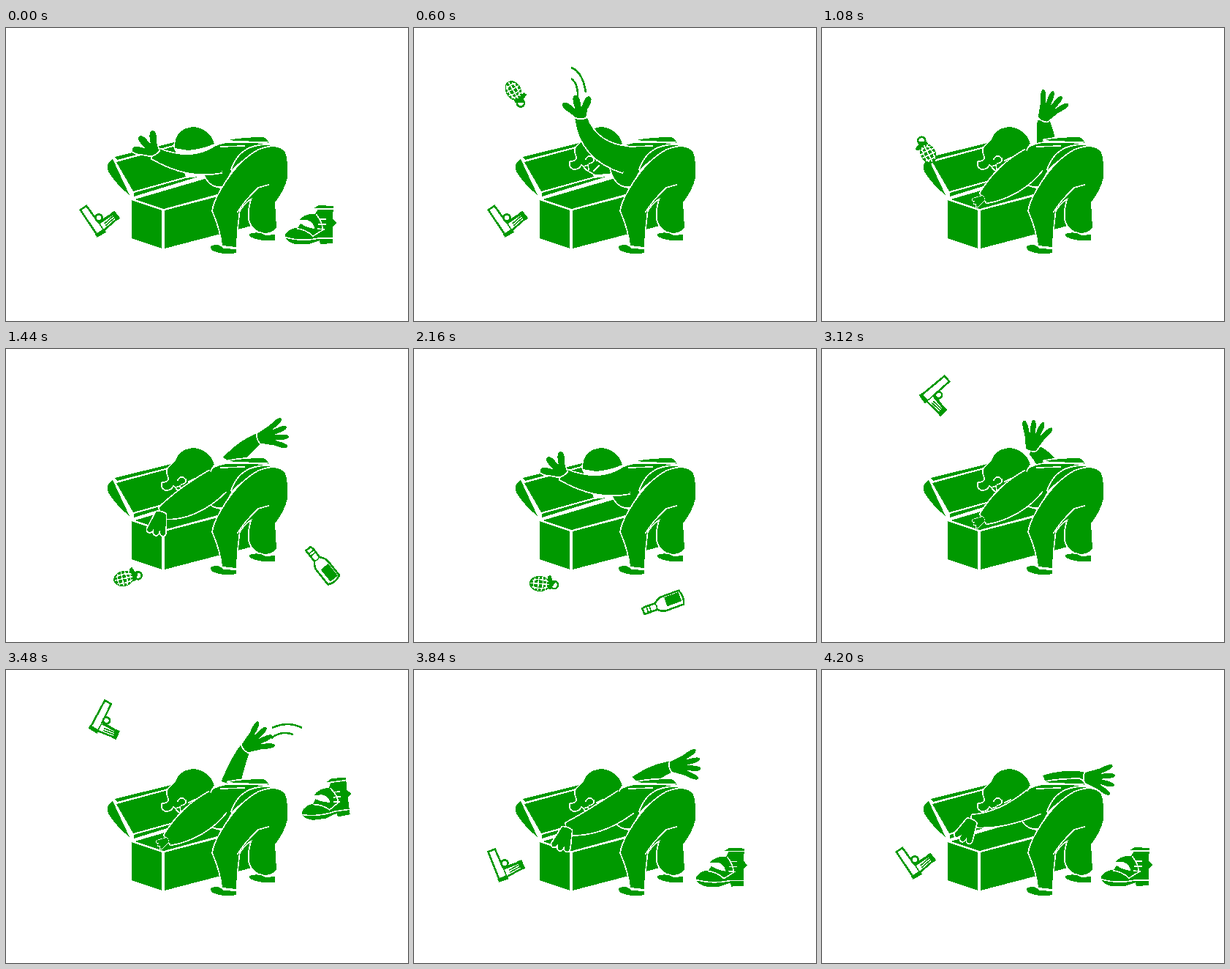
An HTML page that plays this animation: 550 by 400 pixels, repeating every 4.32 s.

```html
<!DOCTYPE html>
<html lang="en">
<head>
<meta charset="utf-8">
<title>Rummaging in the chest</title>
<style>
  html, body { margin: 0; width: 100%; height: 100%; overflow: hidden; background: #fff; }
  svg { display: block; width: 550px; height: 400px; }
  .solid { fill: #090; }
  .body { fill: #090; stroke: #fff; stroke-width: 3.4; stroke-linejoin: round; paint-order: stroke; }
  .cut { fill: none; stroke: #fff; stroke-width: 1.6; stroke-linecap: round; }
  .line { fill: #fff; stroke: #090; stroke-width: 2.6; stroke-linejoin: round; }
  .thin { fill: none; stroke: #090; stroke-width: 1.6; }
  .swish { fill: none; stroke: #090; stroke-width: 2.6; }
</style>
</head>
<body>
<svg viewBox="0 0 550 400" shape-rendering="crispEdges">
  <g class="solid">
    <path d="M146,179 Q136,185 140,196 Q151,214 169,228Z"/>
    <path d="M149,176 L230,156 L229,160 L152,180Z"/>
    <path d="M151,183 L229,162 L246,203 L174,223Z"/>
    <path d="M175,225 L246,205 L263,203 L175,230Z"/>
    <path d="M176,234 L272,206 L300,224 L216,247Z"/>
    <path d="M172,235 L213,249 V301 L172,287Z"/>
    <path d="M217,249 L340,217 V269 L217,301Z"/>
  </g>

  <g id="farArm" class="body">
    <path id="farSleeve"/>
    <path id="farHand"/>
  </g>

  <g class="body">
    <path d="M304,153 Q325,149 352,149 Q359,151 359,158Z"/>
    <path id="face" d="M231,153 L222,163 Q219,168 223,176 Q224,182 214,183 Q212,189 218,192 Q226,193 229,185 L236,193 L248,200 L268,199 L282,170 L284,156Z"/>
    <path d="M231,164 Q230,137 257,135 Q279,138 285,158 Q270,165 249,167Z" stroke="none"/>
    <path d="M283,163 Q300,154 330,156 L360,159 Q325,167 310,192 L297,216 Q284,218 277,209 Q271,202 269,192Z"/>
    <path d="M309,193 Q316,172 334,164 Q348,159 362,160 Q330,172 309,193Z"/>
    <path d="M297,217 Q318,182 345,167 Q372,156 382,170 Q386,180 385,204 Q381,222 368,238 L370,272 Q366,280 352,280 Q337,276 333,262 Q331,248 337,232 Q330,234 319,249 L316,275 L315,299 L296,297 Q294,275 283,250 Q284,238 297,217Z"/>
    <path d="M280,298 Q290,293 298,301 L315,302 V307 Q297,311 281,303Z"/>
    <path d="M333,281 Q346,277 355,283 L368,282 V290 H352 Q338,288 333,284Z"/>
  </g>
  <g class="cut">
    <path d="M317,251 Q326,236 345,218 L359,214"/>
    <path d="M294,162 L326,161 M304,156 L357,156"/>
    <path id="features" d="M235,179 Q240,171 246,178 Q247,184 240,185 M232,189 L238,187 L239,193 M246,195 L253,188 M250,181 L258,177"/>
  </g>

  <g class="body">
    <path id="nearArm"/>
    <path id="openHand"/>
    <path id="gripHand"/>
  </g>

  <path id="swishLeft" class="swish" d="M215,54 Q231,60 235,88 M215,69 Q225,76 224,96"/>
  <path id="swishRight" class="swish" d="M364,79 Q386,69 405,79 M363,93 Q377,82 393,88"/>

  <g id="grenade">
    <circle class="line" cx="14" cy="0" r="5"/>
    <path class="solid" d="M4,-6 L4,-11 L8,-13 L11,-6 L15,-4 L10,6 L4,6Z"/>
    <ellipse class="solid" cx="-6" cy="0" rx="14" ry="10.5"/>
    <path class="cut" d="M-16,-4 Q-6,-8 5,-4 M-18,0 H6 M-16,5 Q-6,8 5,4 M-13,-7 Q-16,0 -13,7 M-8,-9 V9 M-3,-9 Q0,0 -3,9 M2,-7 Q5,0 2,7"/>
  </g>

  <g id="bottle">
    <path class="line" d="M-29,-4 L-23,-5 L-10,-4.5 Q-5,-10 2,-10 L26,-10 Q31,0 26,10 L2,10 Q-5,10 -10,4.5 L-29,4.5Z"/>
    <path class="thin" d="M-23,-5 V5 M-19,-5 V5 M-11,-4 Q-8,0 -11,4"/>
    <path id="label" class="solid" d="M4,-8 H25 V5 H4Z"/>
  </g>

  <g id="gun">
    <path class="line" d="M-19,-15 L23,-15 L23,-5 L-5,-4 L-6,20 L-15,21 L-18,-3Z"/>
    <circle class="line" cx="0" cy="0" r="4.5"/>
    <path class="thin" d="M-20,-4 H-5 M-14,2 L-12,18 M-11,2 L-9,18 M-7,-3 V18"/>
    <path class="solid" d="M-21,-17 H-16 V-3 H-22Z M-17,18 L-4,17 V23 L-17,24Z"/>
  </g>

  <g id="boot">
    <path class="solid" d="M-34,12 Q-28,3 -17,3 L-13,-3 Q-4,3 6,4 Q6,-4 -4,-8 L-15,-8 Q-7,-17 7,-16 L11,-23 L5,-24 L12,-28 L32,-27 L31,-10 L36,-4 L31,1 V24 L14,25 L13,20 L-2,25 H-20 Q-35,21 -34,12Z"/>
    <path class="cut" d="M9,-15 Q18,-3 17,6 L4,14 Q-6,5 -17,4 M-33,16 Q-12,22 12,17 H31 M14,-9 L21,-9 M12,-2 L21,-2 M11,4 L19,5 M8,-23 L31,-23"/>
  </g>
</svg>
<script>
const LOOP = 4320, STEP = 120, HALF = 18, COUNT = 34;
const el = id => document.getElementById(id);
const show = (id, on) => { el(id).style.display = on ? '' : 'none'; };
const draw = (id, d) => el(id).setAttribute('d', d);
const place = (id, x, y, a, s = 1) =>
  el(id).setAttribute('transform', `translate(${x} ${y}) rotate(${a}) scale(${s})`);

const linear = u => u, easeIn = u => u * u, easeOut = u => u * (2 - u);

// Index of the leg of a keyed list that t falls in, and how far along it is.
function leg(keys, t) {
  let i = 0;
  while (i < keys.length - 2 && t >= keys[i + 1][0]) i++;
  const u = (t - keys[i][0]) / (keys[i + 1][0] - keys[i][0]);
  return [i, Math.min(1, Math.max(0, u))];
}
function blend(keys, t) {
  const [i, u] = leg(keys, t);
  return keys[i].map((v, n) => v + (keys[i + 1][n] - v) * u).slice(1);
}

// Tapered limb through shoulder, middle and wrist, left open at the shoulder.
function limb(x, y, w) {
  const mix = ([a, m, b], u) => a * (1 - u) * (1 - 2 * u) + m * 4 * u * (1 - u) + b * u * (2 * u - 1);
  const near = [], far = [];
  for (let u = 0; u <= 1; u += 1 / 8) {
    const px = mix(x, u), py = mix(y, u), r = mix(w, u);
    const a = Math.atan2(mix(y, u + .01) - py, mix(x, u + .01) - px);
    const dx = r * Math.sin(a), dy = r * Math.cos(a);
    near.push([px + dx, py - dy]);
    far.unshift([px - dx, py + dy]);
  }
  return 'M' + [...near, ...far].join('L');
}

// Hand pointing right from its wrist: fingers fan out between two angles.
function hand(count, from, to, length, palm, half) {
  const at = (deg, r) => [r * Math.cos(deg * Math.PI / 180), r * Math.sin(deg * Math.PI / 180)];
  let d = 'M0,-7';
  for (let i = 0; i < count; i++) {
    const a = from + (to - from) * i / (count - 1);
    d += `L${at(a - half, palm)}Q${at(a - half * .7, length)} ${at(a, length)}` +
         `Q${at(a + half * .8, length)} ${at(a + half, palm)}`;
  }
  return d + 'L0,7Q-3,0 0,-7Z';
}
draw('farHand', hand(4, -24, 34, 41, 23, 8.5));
draw('openHand', hand(3, -52, 23, 31, 15, 16));
draw('gripHand', hand(3, -20, 20, 31, 24, 9.5));

// Near arm: phase, middle x y, wrist x y, hand angle, half width, hand size.
const lean = [248, 185, 203, 171, -118, 12, 1];
const toss = [249, 160, 228, 122, -90, 13, 1];
const dig  = [256, 207, 221, 232, 150, 20, .5];
const grab = [250, 207, 212, 224, 104, 19, 1];
const pull = [246, 200, 205, 206, 117, 12, 1];
const nearPoses = [[0, lean], [2, lean], [4, toss], [5, toss], [8, dig], [11, dig], [12, grab], [17, pull]]
  .map(([t, pose]) => [t, ...pose]);
const nearShoulder = [290, 180];

// Far arm: phase, wrist x y, hand angle.
const farPoses = [[7, 270, 150, -95], [10, 318, 112, -50], [11, 327, 107, -40], [12, 346, 122, -18], [17, 360, 147, 0]];
const farShoulder = [307, 156];

// Thrown things: key points [picture, x, y, angle] for release, top, landing and rest.
const things = {
  grenade: { from: 2, to: 18, path: [[2, 166, 104, 25], [4, 112, 86, 95], [9, 163, 309, 342], [16, 178, 321, 365]] },
  bottle: { from: 8, to: 23, path: [[7, 385, 130, -40], [8, 408, 120, -25], [10, 432, 295, 51], [16, 341, 348, -20], [21, 346, 357, -23]] },
  gun: { from: 20, to: 39, path: [[20, 195, 118, -29], [26, 142, 56, -45], [30, 124, 264, -112], [33, 127, 259, -124]] },
  boot: { from: 25, to: 34, path: [[24, 395, 125, -30], [25, 420, 115, -20], [28.2, 447, 275, 0], [31, 416, 270, 0]] }
};

// Slows while rising, speeds up while falling, then slides to a stop.
function fly({ path }, t) {
  const [i, u] = leg(path, t);
  const [, x0, y0, a0] = path[i], [, x1, y1, a1] = path[i + 1];
  const along = i < 2 ? linear : easeOut, drop = i === 1 ? easeIn : easeOut;
  return [x0 + (x1 - x0) * along(u), y0 + (y1 - y0) * drop(u), a0 + (a1 - a0) * along(u)];
}

function drawNear(p) {
  const [mx, my, wx, wy, angle, half, size] = blend(nearPoses, p);
  const [sx, sy] = nearShoulder, open = p < 7;
  draw('nearArm', limb([sx, mx, wx], [sy, my, wy], [18, half, 8]));
  show('openHand', open);
  show('gripHand', !open);
  place(open ? 'openHand' : 'gripHand', wx, wy, angle, size);
}

function drawFar(p) {
  const [wx, wy, angle] = blend(farPoses, p);
  const [sx, sy] = farShoulder;
  draw('farSleeve', limb([sx, (sx + wx) / 2, wx], [sy, (sy + wy) / 2 - 3, wy], [13, 10.5, 7.5]));
  place('farHand', wx, wy, angle);
  show('farArm', p >= 8);
}

function render(ms) {
  const tick = Math.floor((ms % LOOP) / STEP);
  const pic = Math.max(0, tick - 2), p = tick % HALF;

  drawNear(p);
  drawFar(p);
  show('face', p > 2);
  show('features', p > 2);
  show('swishLeft', p === 4 || p === 5);
  show('swishRight', p === 11);
  el('swishLeft').setAttribute('transform', `rotate(${tick < HALF ? 0 : -11} 228 126)`);

  for (const [id, thing] of Object.entries(things)) {
    const n = pic + COUNT <= thing.to ? pic + COUNT : pic;
    const seen = n >= thing.from && n <= thing.to;
    show(id, seen);
    if (seen) place(id, ...fly(thing, n));
  }
  show('label', pic < 18);
}

const start = performance.now();
function loop() {
  render(performance.now() - start);
  requestAnimationFrame(loop);
}
loop();
</script>
</body>
</html>
```
